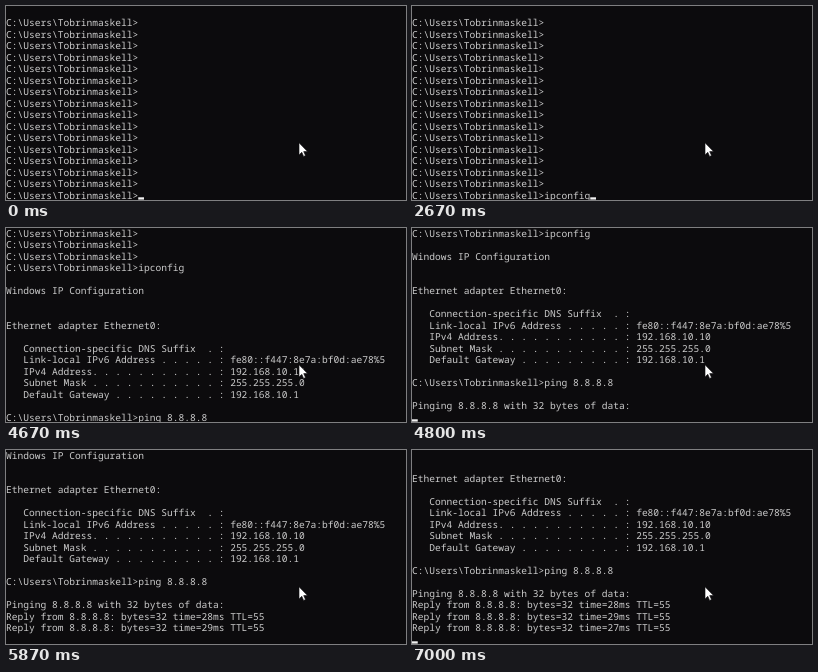
These frames come from a looping animation (400 by 194 pixels, 8 s). An HTML page:

```html
<!DOCTYPE html>
<html lang="en">
<head>
<meta charset="utf-8">
<title>Console</title>
<style>
  html, body { margin: 0; height: 100%; overflow: hidden; background: #0c0b0d; }
  svg { display: block; width: 400px; height: 194px; }
  text {
    font: 9.583px "Noto Sans Mono", "DejaVu Sans Mono", monospace;
    fill: #ccc;
    white-space: pre;
    text-rendering: geometricPrecision;
  }
</style>
</head>
<body>
<svg viewBox="0 0 400 194">
  <rect width="400" height="194" fill="#0c0b0d"/>
  <g id="screen"></g>
  <rect id="caret" y="191.3" width="5.75" height="2.3" fill="#f2f2f2"/>
  <path d="M293 136.8V148.9L295.8 146.3L297.6 150.4L299.5 149.6L297.7 145.6H301.5Z"
        fill="#fff" stroke="#0c0b0d" stroke-width=".6"/>
</svg>
<script>
const LOOP = 8000, CELL = 5.75, PITCH = 11.52, BASE = 192.9, ROWS = 17;
const PROMPT = "C:\\Users\\Tobrinmaskell>";
const reply = ms => `Reply from 8.8.8.8: bytes=32 time=${ms}ms TTL=55`;

const config = [
  "",
  "Windows IP Configuration",
  "",
  "",
  "Ethernet adapter Ethernet0:",
  "",
  "   Connection-specific DNS Suffix  . :",
  "   Link-local IPv6 Address . . . . . : fe80::f447:8e7a:bf0d:ae78%5",
  "   IPv4 Address. . . . . . . . . . . : 192.168.10.10",
  "   Subnet Mask . . . . . . . . . . . : 255.255.255.0",
  "   Default Gateway . . . . . . . . . : 192.168.10.1",
  ""
];

const idle = ["", ...Array(15).fill(PROMPT)];
const listed = [...idle, PROMPT + "ipconfig", ...config];
const pinging = [...listed, PROMPT + "ping 8.8.8.8", "", "Pinging 8.8.8.8 with 32 bytes of data:"];
const first = [...pinging, reply(28)];
const second = [...first, reply(29)];
const third = [...second, reply(27)];

// Start time, lines above, bottom line, caret shown
const steps = [
  [0, idle, PROMPT, true],
  [1470, idle, PROMPT + "i", true],
  [1530, idle, PROMPT + "ip", true],
  [1930, idle, PROMPT + "ipco", false],
  [2200, idle, PROMPT + "ipconf", true],
  [2400, idle, PROMPT + "ipconfi", true],
  [2670, idle, PROMPT + "ipconfig", true],
  [3000, listed, PROMPT, true],
  [3670, listed, PROMPT + "ipconfig", true],
  [4270, listed, PROMPT + "ping 8.8.8.8", true],
  [4670, listed, PROMPT + "ping 8.8.8.8", false],
  [4800, pinging, "", true],
  [4870, first, "", true],
  [5670, first, "", false],
  [5870, second, "", false],
  [6730, second, "R", false],
  [6930, third, "", true]
];

const screen = document.getElementById("screen");
const caret = document.getElementById("caret");
const rows = Array.from({ length: ROWS }, (_, i) => {
  const row = document.createElementNS("http://www.w3.org/2000/svg", "text");
  row.setAttribute("x", 0);
  row.setAttribute("y", BASE - (ROWS - 1 - i) * PITCH);
  screen.append(row);
  return row;
});

let shown;
function draw(time) {
  const step = steps.findLast(s => s[0] <= time);
  if (step === shown) return;
  shown = step;
  const [, above, line, caretOn] = step;
  const view = [...above, line].slice(-ROWS);
  rows.forEach((row, i) => { row.textContent = view[i]; });
  caret.setAttribute("x", line.length * CELL);
  caret.setAttribute("visibility", caretOn ? "visible" : "hidden");
}

const start = performance.now();
function tick() {
  draw((performance.now() - start) % LOOP);
  requestAnimationFrame(tick);
}
tick();
</script>
</body>
</html>
```
